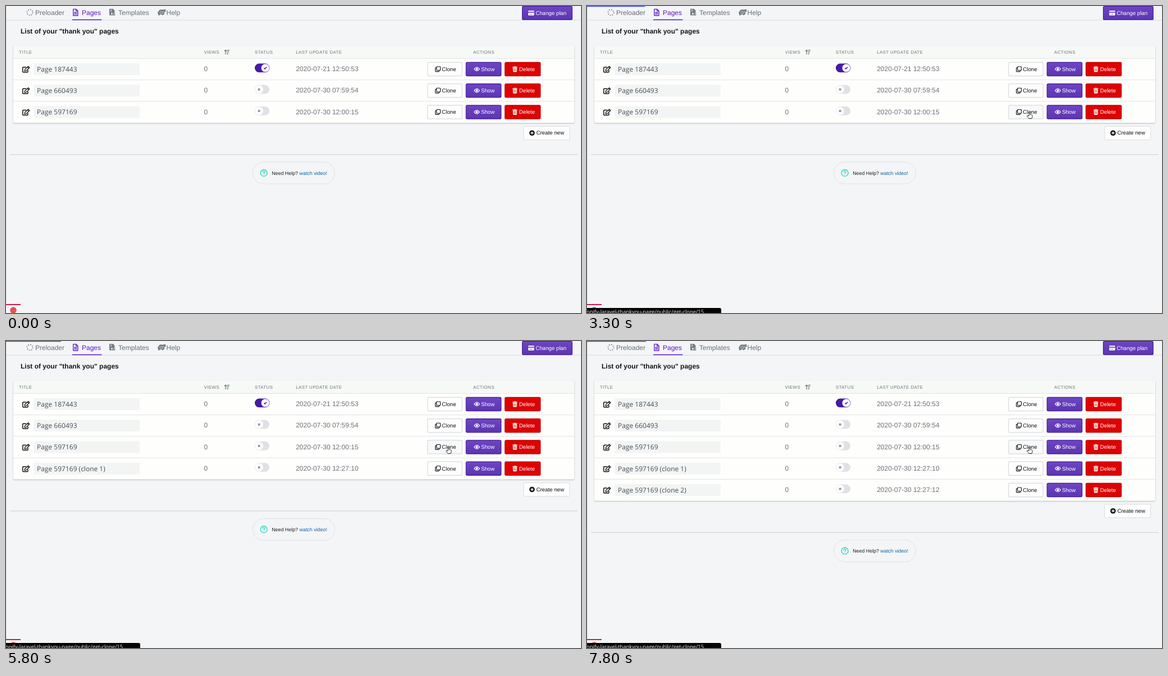
These frames come from a looping animation (1024x547 px, 8 s). An HTML page:

```html
<!DOCTYPE html>
<html lang="en">
<head>
<meta charset="utf-8">
<title>Pages</title>
<style>
html, body { margin: 0; height: 100%; overflow: hidden; background: #f4f5f7 }
svg.stage { display: block; width: 100vw; height: 100vh }
text { font-family: "Liberation Sans", Arial, sans-serif; font-size: 12px; text-rendering: geometricPrecision; white-space: pre }
.nav { fill: #6a6e76 }
.head { font-size: 7.8px; letter-spacing: .45px; fill: #6b7078 }
.btn { font-size: 9.7px }
.help { font-size: 8.9px }
.page { font-family: "Open Sans", "Noto Sans", sans-serif; fill: #464c54 }
.url { font-family: "Open Sans", "Noto Sans", sans-serif; font-size: 9.35px; fill: #eee }
.line { fill: none; stroke: currentColor; stroke-linecap: round; stroke-linejoin: round }
.shadow { filter: drop-shadow(0 1px 1px rgba(0,0,0,.25)) }
</style>
</head>
<body>
<svg class="stage" viewBox="0 0 1024 547" preserveAspectRatio="none">
  <defs>
    <linearGradient id="violet" x2="0" y2="1"><stop stop-color="#6e45c3"/><stop offset="1" stop-color="#5c35b2"/></linearGradient>
    <g id="edit" class="line" stroke-width="1.5">
      <path d="M6.5 2.2H1.8Q.8 2.2 .8 3.2V10.2Q.8 11.2 1.8 11.2H9Q10 11.2 10 10.2V7.6"/>
      <path d="M4.6 6.3 10.6.7 12.9 3 7 8.6 4.3 9Z M9.2 2 11.5 4.3" stroke-width="1.3"/>
    </g>
    <g id="clone" class="line" stroke-width="1.1">
      <rect x="2.8" y=".6" width="6.7" height="6.7" rx=".7"/>
      <path d="M2.6 2.7H1.4Q.6 2.7 .6 3.5V8.7Q.6 9.5 1.4 9.5H6.7Q7.4 9.5 7.4 8.7V7.5"/>
    </g>
    <g id="eye">
      <path class="line" stroke-width="1.1" d="M.6 4Q5.5-2.6 10.4 4Q5.5 10.6 .6 4Z"/>
      <circle cx="5.5" cy="4" r="2" fill="currentColor"/>
    </g>
    <g id="trash">
      <path fill="currentColor" d="M0 .9H2.7L3.1 0H5.5L5.9.9H8.6V2.1H0Z M.6 2.7H8L7.6 9.1Q7.5 10 6.7 10H1.9Q1.1 10 1 9.1Z"/>
      <path d="M2.6 4V8.6M4.3 4V8.6M6 4V8.6" stroke="#dc0303" stroke-width=".7"/>
    </g>
  </defs>

  <rect width="1024" height="547" fill="#f4f5f7"/>
  <path d="M.5 0V547" stroke="#d9dce1"/>
  <path d="M0 25.2H1024" stroke="#d5dce6"/>

  <circle cx="42.5" cy="11.5" r="5.1" fill="none" stroke="#777b83" stroke-width="1.7" stroke-dasharray="1.7 2.3"/>
  <text class="nav" x="52" y="15.6">Preloader</text>
  <g color="#5b18c9">
    <path class="line" stroke-width="1.3" d="M119.8 5.6H125L128 8.6V17H119.8Z M124.7 5.8V8.9H127.8 M121.8 11.5H126 M121.8 14H126"/>
    <text x="135" y="15.6" fill="#5b18c9">Pages</text>
    <path d="M118 24.6H170.5" stroke="#5b18c9" stroke-width="1.5"/>
  </g>
  <path d="M184 5H190.5L193.5 8V11L190 16.5H184Z" fill="#777b83"/>
  <path d="M185.8 7H188.3M185.8 9H188.3" stroke="#f4f5f7"/>
  <path d="M189 17 194.3 11.5V17Z" fill="#9a9da3"/>
  <circle cx="188.5" cy="13.6" r="1.5" fill="#f4f5f7"/>
  <text class="nav" x="200" y="15.6">Templates</text>
  <path d="M270 11.5 274 6.5H281L284 5.5 284.5 9.5 281.5 12 282.5 14 279 16.5 276.5 15 271.5 17Z" fill="#777b83"/>
  <path d="M273 12 277 9.3 279 11.2 282 9.5 M274 14.5 279.5 12.5" fill="none" stroke="#f4f5f7" stroke-width=".8"/>
  <text class="nav" x="285.5" y="15.6">Help</text>

  <rect x="919.5" y=".5" width="88.7" height="24" rx="2" fill="url(#violet)" stroke="#421a99" stroke-width="1.2"/>
  <rect x="930" y="8.3" width="10.5" height="8.4" rx="1" fill="#fff"/>
  <path d="M930 11.2H940.5" stroke="#6039b6" stroke-width="1.6"/>
  <path d="M931.5 14.6H933.3M934.2 14.6H937" stroke="#6039b6" stroke-width=".8"/>
  <text class="btn" x="943.2" y="15.8" fill="#fff">Change plan</text>
  <text x="26" y="49" font-weight="bold" fill="#15171a">List of your "thank you" pages</text>

  <g class="shadow">
    <rect id="table" x="13" y="70.5" width="999" rx="2" fill="#fefefc"/>
    <path d="M13 93.3V72Q13 70.5 15 70.5H1010Q1012 70.5 1012 72V93.3Z" fill="#f7f9f7"/>
  </g>
  <path d="M13 93.4H1012" stroke="#e1e4e6"/>
  <g class="head">
    <text class="head" x="23" y="84.9">TITLE</text>
    <text class="head" x="352.7" y="84.9">VIEWS</text>
    <text class="head" x="443" y="84.9">STATUS</text>
    <text class="head" x="516.3" y="84.9">LAST UPDATE DATE</text>
    <text class="head" x="832" y="84.9">ACTIONS</text>
  </g>
  <path class="line" color="#5f646c" stroke-width="1.1" d="M391 86V78.5M389.3 80.2 391 78.3 392.7 80.2M394 78.7H397.8M394 81H396.9M394 83.3H396M394 85.6H395.2"/>
  <g id="rows"></g>

  <g id="foot">
    <rect x="921.8" y="6.3" width="82" height="24" rx="2" fill="#fefefe" stroke="#d8dade"/>
    <circle cx="936.8" cy="18.1" r="4.8" fill="#111"/>
    <path d="M934.2 18.1H939.4M936.8 15.5V20.7" stroke="#fff" stroke-width="1.5"/>
    <text class="btn" x="944.4" y="21.3" fill="#111">Create new</text>
    <path d="M7 56.4H1018" stroke="#d3d5d9" stroke-width="1.2"/>
    <rect x="439.5" y="70" width="146" height="38.8" rx="19.4" fill="#f4f5f7" stroke="#dfe1e5"/>
    <circle cx="459.2" cy="89.3" r="5.9" fill="none" stroke="#2bd4c0" stroke-width="1.4"/>
    <path class="line" color="#2bd4c0" stroke-width="1.3" d="M457.3 87.6Q457.6 85.8 459.2 85.9Q461 86 461 87.5Q460.9 88.7 459.3 89.4V90.2M459.3 92.3V92.4"/>
    <text class="help" x="473.2" y="92.4" fill="#1c1e22">Need Help? <tspan fill="#0b62a8">watch video!</tspan></text>
  </g>

  <rect y="533" width="26" height="14" fill="#f8f8f9"/>
  <rect y="531" width="26" height="2" fill="#d0184d"/>
  <circle cx="13" cy="542" r="5.8" fill="#e2554e"/>
  <g id="status">
    <path d="M0 538H236Q239 538 239 541V547H0Z" fill="#050505"/>
    <text class="url" x="208" y="548" text-anchor="end">shopify-laravel-thankyou-page/public/get-clone/15</text>
  </g>

  <rect id="bar" height="1.3" fill="#3443f0"/>
  <path id="arrow" d="M.5.5V11.5L3.1 9.2 4.8 13 6.7 12.2 5 8.5H8.5Z" fill="#111" stroke="#fff" stroke-width=".8"/>
  <path id="hand" d="M787 196V190.3Q787 189.3 788 189.3T789 190.3V193.3Q790.2 192.8 790.6 193.7Q791.7 193.3 792 194.3Q793 194.2 793 195.3V197.5Q792.9 199 792 200.5H786.8Q785.5 198.3 783.7 196.3Q783.6 195 784.8 195.1Z" fill="#fff" stroke="#111" stroke-width=".9" stroke-linejoin="round"/>
</svg>
<script>
const $ = id => document.getElementById(id);
const pitch = 38.25, top0 = 93.4;
const pages = [
  ["187443", "21 12:50:53"],
  ["660493", "30 07:59:54"],
  ["597169", "30 12:00:15"],
  ["597169 (clone 1)", "30 12:27:10"],
  ["597169 (clone 2)", "30 12:27:12"]
];

function button(x, w, label, icon, iconX, iconY, textX, fill, edge, ink) {
  return `<g color="${ink}"><rect x="${x}" y="7" width="${w}" height="24.2" rx="2" fill="${fill}" stroke="${edge}" stroke-width="1.2"/>
    <use href="#${icon}" x="${iconX}" y="${iconY}"/>
    <text class="btn" x="${textX}" y="22.6" fill="${ink}">${label}</text></g>`;
}

function toggle(on) {
  const x = on ? 461.7 : 450.7;
  const mark = on ? "M-2.2 0 -.6 1.7 2.4-1.7" : "M-1.7-1.7 1.7 1.7M1.7-1.7-1.7 1.7";
  return `<rect x="443" y="9.2" width="26" height="15.6" rx="7.8" fill="${on ? "#461aa4" : "#dfe1e5"}"/>
    <circle cx="${x}" cy="17" r="7.4" fill="#fff" stroke="${on ? "#461aa4" : "#e4e6e9"}" stroke-width=".6"/>
    <path d="${mark}" transform="translate(${x} 17)" fill="none" stroke="${on ? "#461aa4" : "#81858b"}" stroke-width="1.5"/>`;
}

$("rows").innerHTML = pages.map(([name, date], i) => `<g transform="translate(0 ${top0 + i * pitch})">
  ${i ? '<path d="M13 0H1012" stroke="#e1e4e6"/>' : ""}
  <use href="#edit" x="29" y="13.4" color="#111"/>
  <rect x="49.5" y="8.6" width="188.5" height="21" fill="#f3f5f5"/>
  <text class="page" x="55" y="23.5">Page ${name}</text>
  <text x="352.5" y="22.8" fill="#6b7078">0</text>
  ${toggle(i == 0)}
  <text x="516.2" y="22.8" fill="#6b7078">2020-07-${date}</text>
  ${button(750.7, 61.6, "Clone", "clone", 764, 14, 776.3, "#fefefe", "#d8dade", "#111")}
  ${button(819.3, 62.4, "Show", "eye", 833, 15, 846, "url(#violet)", "#421a99", "#fff")}
  ${button(888.5, 63.2, "Delete", "trash", 902, 14, 913.8, "#dc0303", "#c40000", "#fff")}
</g>`).join("");
const rows = [...$("rows").children];
const hovered = rows[2].querySelector('[href="#clone"]').previousElementSibling;

// start, growth time, width, page swap, gone
const loads = [
  [3100, 300, 103, 3700, 4300],
  [5600, 300, 98, 6000, 6300],
  [7400, 500, 105, 9e3, 9e3]
];
const clamp = v => Math.max(0, Math.min(1, v));
const easeOut = p => 1 - (1 - clamp(p)) ** 2;
const show = (el, on) => el.setAttribute("display", on ? "inline" : "none");

function draw(t) {
  const count = 3 + (t >= 3700) + (t >= 6000);
  const bottom = top0 + count * pitch;
  rows.forEach((row, i) => show(row, i < count));
  $("table").setAttribute("height", bottom - 70.5);
  $("foot").setAttribute("transform", `translate(0 ${bottom})`);

  const load = loads.find(l => t >= l[0] && t < l[4]);
  show($("bar"), load);
  if (load) {
    const [start, grow, width, swap] = load;
    const begun = width * easeOut((t - start + 100) / grow);
    const done = t < swap ? 0 : easeOut((t - swap + 100) / 300);
    $("bar").setAttribute("width", begun + (1024 - begun) * done);
    $("bar").setAttribute("opacity", t >= swap + 200 ? .15 : 1);
  }

  const p = clamp((t - 1300) / 700), k = p * p * (3 - 2 * p);
  const q = clamp((t - 2100) / 200);
  const x = 442 + 341 * k + 5 * q, y = 49 + 232 * k - 92 * q;
  show($("arrow"), t >= 1300 && t < 2300);
  $("arrow").setAttribute("transform", `translate(${x} ${y})`);
  show($("hand"), t >= 2300);
  hovered.setAttribute("fill", t >= 2300 ? "#f8f9fa" : "#fefefe");
  $("status").setAttribute("opacity", clamp((t - 2300) / 300));
}

const origin = performance.now();
function tick() {
  const t = (performance.now() - origin) % 8000;
  draw(Math.floor(t / 100) * 100);
  requestAnimationFrame(tick);
}
tick();
</script>
</body>
</html>
```
